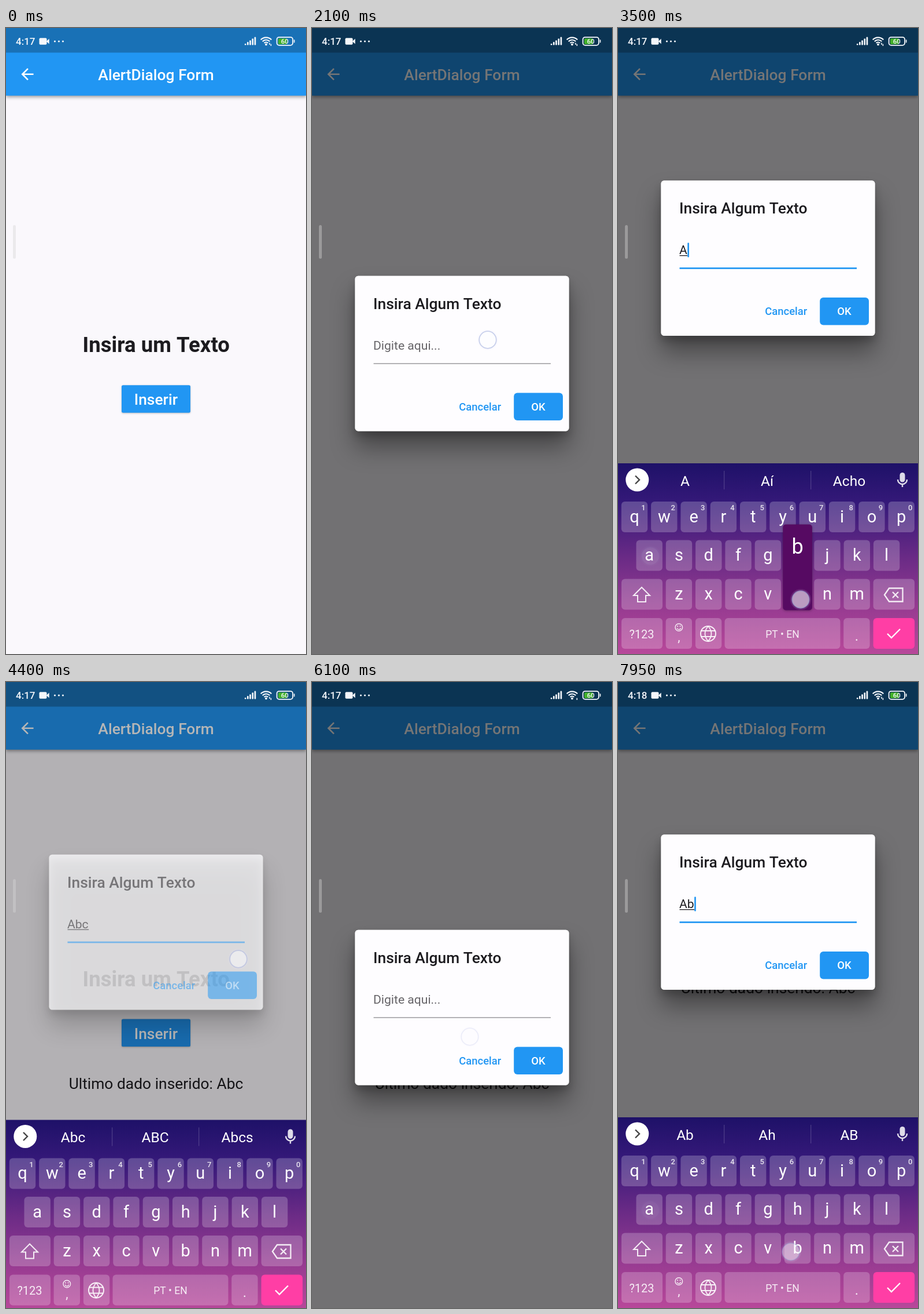
An HTML page with a canvas that plays this animation: 519x1080 px, repeating every 8 s.

```html
<!DOCTYPE html>
<html lang="pt">
<head>
<meta charset="utf-8">
<title>AlertDialog Form</title>
<style>
  html, body { margin: 0; width: 100%; height: 100%; overflow: hidden; background: #faf8fc; }
  canvas { display: block; width: 100%; height: 100%; }
</style>
</head>
<body>
<canvas id="stage" width="519" height="1080"></canvas>
<script>
const g = document.getElementById('stage').getContext('2d');
const LOOP = 8000, BLUE = '#2196f3', INK = '#1c1b1f', LIFT = 164.5, KB_H = 329;
const ROWS = ['qwertyuiop', 'asdfghjkl', 'zxcvbnm'];
const ROW_X = [28.5, 54.2, 105.4], ROW_Y = [92.5, 159, 226], PITCH = 51.3;

// Touches: x, y, press time, release time, key
const touches = [
  [262, 641, 1130, 1280],
  [304, 538, 2090, 2200],
  [41, 979, 2800, 2870],
  [56, 911, 3070, 3150, 'a'],
  [316, 986, 3430, 3560, 'b'],
  [208, 980, 3800, 3890, 'c'],
  [402, 478, 4220, 4330],
  [273, 612, 5700, 5830],
  [300, 540, 6650, 6740],
  [41, 979, 7200, 7270],
  [56, 911, 7510, 7580, 'a'],
  [299, 983, 7770, 7850, 'b'],
];
const typed = [[0, ''], [3150, 'A'], [3560, 'Ab'], [3890, 'Abc'], [4500, ''], [7580, 'A'], [7850, 'Ab']];
const hints = { A: ['A', 'Aí', 'Acho'], Ab: ['Ab', 'Ah', 'AB'], Abc: ['Abc', 'ABC', 'Abcs'] };

let t = 0;
const ramp = (start, span) => Math.min(1, Math.max(0, (t - start) / span));
const out = p => 1 - (1 - p) ** 2;
const between = (a, b) => t >= a && t < b;

// y is the middle of the capital letters
function text(s, x, y, size, color = '#fff', weight = 400, align = 'center') {
  g.font = `${weight} ${size}px Roboto, sans-serif`;
  g.textAlign = align;
  g.fillStyle = color;
  g.fillText(s, x, y + size * 0.355);
  return g.measureText(s).width;
}
function box(x, y, w, h, r, color) {
  g.fillStyle = color;
  g.beginPath();
  g.roundRect(x, y, w, h, r);
  g.fill();
}
function disc(x, y, r, color) { box(x - r, y - r, 2 * r, 2 * r, r, color); }
function draw(d, x, y, { fill, stroke, w = 2, scale = 1 }) {
  const p = new Path2D(d);
  g.save();
  g.translate(x, y);
  g.scale(scale, scale);
  g.lineWidth = w;
  if (fill) { g.fillStyle = fill; g.fill(p); }
  if (stroke) { g.strokeStyle = stroke; g.stroke(p); }
  g.restore();
}
function ring(x, y, r, w, color, from = 0, to = 2 * Math.PI) {
  g.strokeStyle = color;
  g.lineWidth = w;
  g.beginPath();
  g.arc(x, y, r, from, to);
  g.stroke();
}
function shadow(color, blur, y) {
  g.shadowColor = color;
  g.shadowBlur = blur;
  g.shadowOffsetY = y;
}
const noShadow = () => shadow('transparent', 0, 0);

function page(lift) {
  g.fillStyle = '#faf8fc';
  g.fillRect(0, 0, 519, 1080);
  const saved = t >= 4330;
  const y = (saved ? -34.7 : 0) - lift;
  text('Insira um Texto', 259.7, 546.5 + y, 36.6, INK, 700);
  shadow('rgba(0,0,0,.25)', 3, 1);
  box(200, 616.2 + y, 119, 47.5, 2.6, BLUE);
  noShadow();
  if (between(1130, 1330) || between(5700, 5880)) box(200, 616.2 + y, 119, 47.5, 2.6, 'rgba(255,255,255,.2)');
  text('Inserir', 259.3, 641 + y, 26.4, '#fff', 500);
  if (saved) text('Ultimo dado inserido: Abc', 259.5, 727 + y, 26.4, INK);

  shadow('rgba(0,0,0,.4)', 6, 2);
  g.fillStyle = BLUE;
  g.fillRect(0, 0, 519, 116.7);
  noShadow();
  g.fillStyle = 'rgba(0,0,0,.25)';
  g.fillRect(0, 0, 519, 42.5);
  draw('M8 -1H-4.17L1.42-6.59L0-8L-8 0L0 8L1.41 6.59L-4.17 1H8Z', 37, 79.7, { fill: '#fff', scale: 1.32 });
  text('AlertDialog Form', 259.5, 81, 26.4, '#fff', 500);
}

function dialog(value, focused, lift, alpha) {
  g.save();
  g.globalAlpha = alpha;
  g.fillStyle = 'rgba(0,0,0,.54)';
  g.fillRect(0, 0, 519, 1080);
  g.translate(0, -lift);
  shadow('rgba(0,0,0,.38)', 42, 28);
  box(74.5, 427.7, 370, 267.7, 5.3, '#fefdff');
  shadow('rgba(0,0,0,.2)', 14, 8);
  box(74.5, 427.7, 370, 267.7, 5.3, '#fefdff');
  noShadow();
  text('Insira Algum Texto', 106, 475.3, 26.4, INK, 500, 'left');

  const w = value ? text(value, 106, 547.5, 21.12, INK, 400, 'left') : 0;
  if (value) {
    g.fillStyle = INK;
    g.fillRect(106.5, 556.5, w, 1.3);
  } else text('Digite aqui...', 106, 547.5, 21.12, '#666468', 400, 'left');

  g.fillStyle = focused ? BLUE : '#949396';
  const thick = focused ? 2.7 : 1.4;
  g.fillRect(106.5, 579 - thick / 2, 306.5, thick);
  const edits = [2200, 6740, ...typed.map(e => e[0])].filter(e => e <= t);
  if (focused && (t - Math.max(...edits)) % 1000 < 500) box(106.5 + w, 535, 2.7, 25, 1, BLUE);

  text('Cancelar', 290.7, 653.3, 18.48, BLUE, 500);
  box(349.2, 629.5, 84.8, 47.5, 6, BLUE);
  if (between(4220, 4400)) box(349.2, 629.5, 84.8, 47.5, 6, 'rgba(255,255,255,.2)');
  text('OK', 391.5, 653.3, 18.48, '#fff', 500);
  g.restore();
}

function toolbar(value) {
  const soft = 'rgba(255,255,255,.85)', rule = 'rgba(255,255,255,.17)';
  disc(33.3, 28.5, 20, '#fff');
  draw(value ? 'M-3.5-7L3.5 0L-3.5 7' : 'M3.5-7L-3.5 0L3.5 7', 33.5, 28.5, { stroke: '#444', w: 2.4 });
  if (value) {
    hints[value].forEach((s, i) => text(s, 116 + 142 * i, 30, 24.5));
    g.fillStyle = rule;
    g.fillRect(183, 13, 1.3, 32);
    g.fillRect(333, 13, 1.3, 32);
  } else {
    draw('M-10-10H10V4L4 10H-10ZM10 4H4V10M-5 1Q0 7 5 1', 101, 28.5, { stroke: soft, w: 2.4 });
    disc(-4 + 101, 24.5, 1.8, soft);
    disc(4 + 101, 24.5, 1.8, soft);
    text('GIF', 175, 28.5, 19.5, soft, 900);
    ring(251, 29, 6.5, 5, soft);
    g.setLineDash([5.24, 5.23]);
    ring(251, 29, 10, 3.6, soft);
    g.setLineDash([]);
    box(315, 18, 22, 22, 2, soft);
    g.fillStyle = rule;
    g.fillRect(371, 13, 1.3, 32);
    for (const x of [409.3, 417.8, 426.3]) disc(x, 29, 2.7, soft);
  }
  box(487.5, 16, 9, 16.5, 4.5, soft);
  draw('M-8 0A8 8 0 0 0 8 0M0 8V13', 492, 28, { stroke: soft, w: 2.4 });
}

function keyboard(value, upper, drop) {
  g.save();
  g.translate(0, 1080 - KB_H + drop);
  const sky = g.createLinearGradient(0, 0, 0, KB_H);
  [[0, '#1e1168'], [.22, '#36197a'], [.5, '#6b2b86'], [.78, '#9a3c92'], [1, '#b8489a']]
    .forEach(([p, c]) => sky.addColorStop(p, c));
  g.fillStyle = sky;
  g.fillRect(0, 0, 519, KB_H);
  toolbar(value);

  const key = (x, y, w, color = 'rgba(255,255,255,.22)') => box(x, y - 26.5, w, 53, 6, color);
  const glyph = c => upper ? c.toUpperCase() : c;
  const letter = (c, x, y, size) => text(glyph(c), x, y - (upper ? 0 : 1), size);
  ROWS.forEach((row, r) => [...row].forEach((c, i) => {
    const x = ROW_X[r] + PITCH * i, y = ROW_Y[r];
    key(x - 22.7, y, 45.4);
    letter(c, x, y, 29);
    if (!r) text((i + 1) % 10, x + 15.5, y - 16, 13, 'rgba(255,255,255,.85)', 500);
  }));

  const white = 'rgba(255,255,255,.88)';
  key(6, 226, 71);
  draw('M0-13L14 1H7V12H-7V1H-14Z', 41, 227, { stroke: white, fill: upper ? white : '' });
  key(441.6, 226, 71.5);
  draw('M-16 0L-8-11.5H15.5V11.5H-8ZM-2-5L8 5M8-5L-2 5', 477, 227, { stroke: white, w: 2.3 });

  const y = 293.5;
  for (const [x, w] of [[6, 71], [82.6, 45.4], [133.9, 45.4], [184.5, 200], [390.2, 45.4]]) key(x, y, w);
  key(441.6, y, 71.5, '#ff3ea5');
  text('?123', 41, y + 1, 20, white);
  text(',', 105.5, y + 6, 22, white);
  ring(105.3, 283, 6.3, 1.4, white);
  ring(105.3, 283.5, 3.3, 1.3, white, .2, 2.9);
  disc(103, 281, 1, white);
  disc(107.6, 281, 1, white);
  ring(156, y + .5, 13, 2, white);
  draw('M0-13Q-11 0 0 13Q11 0 0-13M-12-5H12M-12 5H12', 156, y + .5, { stroke: white, w: 1.8 });
  text('PT • EN', 284.5, y + 1, 17.5, white);
  text('.', 413, y + 4, 24, white);
  draw('M-11 0L-4 7L11-8', 477, y + .5, { stroke: '#fff', w: 2.4 });

  const press = touches.find(p => p[4] && between(p[2], p[3] + 30));
  if (press) {
    const r = ROWS.findIndex(row => row.includes(press[4]));
    const x = ROW_X[r] + PITCH * ROWS[r].indexOf(press[4]), ky = ROW_Y[r];
    shadow('rgba(0,0,0,.3)', 4, 1);
    box(x - 25.3, ky - 120.5, 50.6, 148, 5, '#560a62');
    noShadow();
    letter(press[4], x, ky - 82, 36);
  }
  g.restore();
}

function statusBar() {
  const white = '#f4f7fb';
  text(t < 7200 ? '4:17' : '4:18', 17, 23, 17, white, 500, 'left');
  box(57.5, 17.3, 13, 11.5, 2, white);
  draw('M0 0L5-4.5V4.5Z', 69.7, 23, { fill: white });
  for (const x of [84.5, 91.5, 98.5]) disc(x, 23, 1.6, white);
  for (let i = 0; i < 5; i++) box(412.8 + 4.2 * i, 27 - 2.9 * i, 2.7, 2.6 + 2.9 * i, 1, white);
  const a = -Math.PI * .76, b = -Math.PI * .24;
  for (const r of [4.5, 8.5, 12.7]) ring(450, 29, r, 2.2, white, a, b);
  disc(450, 28.4, 1.9, white);
  if (!between(4500, 6450)) box(455.2, 25.5, 1.6, 3.6, .5, white);
  box(457.6, 27.5, 1.6, 3.6, .5, white);
  box(471, 18, 15, 10, 1.5, '#43b02a');
  g.strokeStyle = white;
  g.lineWidth = 1.8;
  g.beginPath();
  g.roundRect(468.6, 15.8, 27.5, 14, 4);
  g.stroke();
  box(497.8, 20, 1.7, 5.5, .8, white);
  text('60', 482.3, 23, 11.5, white, 500);
}

function pointer([x, y, down, up]) {
  if (t < down) return;
  g.globalAlpha = 1 - ramp(up, 400);
  disc(x, y, 18, 'rgba(225,225,255,.12)');
  disc(x, y, 14.5, 'rgba(255,255,255,.55)');
  ring(x, y, 14.8, 1.8, 'rgba(165,178,222,.6)');
  g.globalAlpha = 1;
}

function frame(now) {
  t = now % LOOP;
  const value = typed.filter(e => e[0] <= t).pop()[1];
  const fade = ramp(1300, 150) - ramp(4330, 150) + ramp(5850, 150);
  const lift = ramp(2280, 100) - ramp(4380, 100) + ramp(6830, 100);
  const shown = out(ramp(2280, 250)) - ramp(4380, 180) ** 2 + out(ramp(6830, 250));
  const resized = between(2280, 4380) || t >= 6830;
  const focused = between(2200, 4500) || t >= 6740;
  const upper = between(2870, 3150) || between(7270, 7580);

  page(resized ? LIFT : 0);
  if (fade > 0) dialog(value, focused, lift * LIFT, fade);
  if (shown > 0) keyboard(value, upper, (1 - shown) * KB_H);
  box(12, 340, 5, 58, 2.5, 'rgba(214,214,214,.41)');
  statusBar();
  touches.forEach(pointer);
  requestAnimationFrame(() => frame(performance.now()));
}
frame(performance.now());
</script>
</body>
</html>
```
